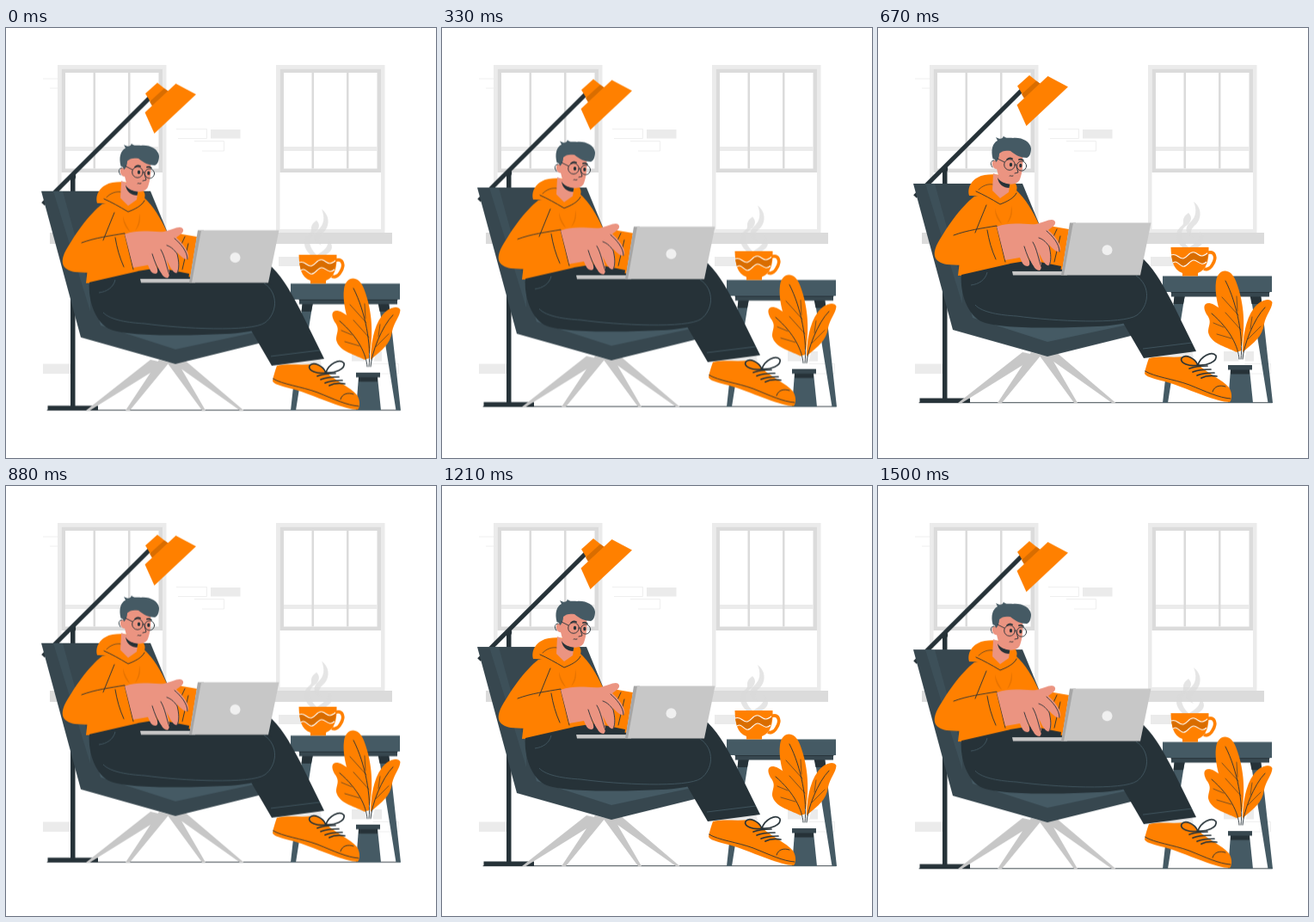
Recreate the animation shown at these times as an HTML page. Size 500x500 px, loop 1540 ms.

```html
<!DOCTYPE html>
<html lang="en">
<head>
<meta charset="utf-8">
<title>Working in an armchair</title>
<style>
html, body { margin: 0; width: 100%; height: 100%; overflow: hidden; background: #fff; }
svg { display: block; width: 100vw; height: 100vh; }
.orange { fill: #ff8000; }
.shade { fill: #d96d00; }
.ink { fill: #263238; }
.slate { fill: #455a64; }
.deep { fill: #37474f; }
.skin { fill: #eb9481; }
.pale { fill: #ebebeb; }
.mist { fill: #dbdbdb; }
.grey { fill: #c7c7c7; }
.white { fill: #fff; }
.line { fill: none; stroke: #263238; stroke-width: .9; stroke-linecap: round; stroke-linejoin: round; }
.thin { stroke-width: .6; }
.bold { stroke-width: 1.7; }
.seam { fill: none; stroke: #455a64; stroke-width: .9; }
.outline { fill: none; stroke: #ebebeb; stroke-width: .8; }
#scene { animation: float 1540ms linear infinite; }
@keyframes float {
  0%, 100% { transform: translateY(-.1px); }
  46% { transform: translateY(-9.6px); }
  95% { transform: translateY(.4px); }
}
</style>
</head>
<body>
<svg viewBox="0 0 500 500" xmlns="http://www.w3.org/2000/svg">
<defs>
  <g id="window">
    <path class="pale" d="M0 0H126.500V196H0Z"/>
    <path class="white" d="M4.500 4.500H122V191H4.500Z"/>
    <path class="mist" d="M4.500 4.500H122V125H4.500Z"/>
    <path class="white" d="M9 9H117.500V120.500H9Z"/>
    <path class="pale" d="M9 95H117.500V100H9Z"/>
    <path class="mist" d="M41.500 9h2.500V120.500h-2.500ZM82 9h2.500V120.500H82Z"/>
  </g>
</defs>

<g id="wall">
  <use href="#window" x="60" y="43"/>
  <use href="#window" x="314" y="43"/>
  <path class="mist" d="M51 238H191V251H51ZM309 238H449V251H309Z"/>
  <path class="pale" d="M43 390.500H75V402H43ZM317 266H349V277H317ZM402 376H437V387.500H402ZM238 118H272.500V128.500H238Z"/>
  <path class="outline" d="M198 117.500H233.500V128.500H200M219 131.500H253.500V143H228M422 390.500H456.500V402H428M43 59H61M51 70H61"/>
</g>

<g id="scene">
  <path class="line" d="M48 444.700H458"/>

  <g id="lamp">
    <path class="ink" d="M75 172H80.500V440H75ZM48.500 439.500H107V445H48.500Z"/>
    <circle class="ink" cx="77.700" cy="173" r="3.500"/>
    <path class="line" style="stroke-width:5.200;stroke-linecap:butt" d="M43 205 168 80.500"/>
    <path class="orange" d="M162 76.500 176 64 188.500 74 171 91Z"/>
    <path class="shade" d="M167 86 184 70.500 189 74 170 91Z"/>
    <path class="orange" d="M161.500 98.500 197.500 65 221 77.500 172.500 123Z"/>
  </g>

  <g id="chair">
    <path class="grey" d="M168 386 93 445H97.500L186 390ZM178 386 139 445H144L190 389ZM187 389 228 445H232L199 388ZM193 389 272 445H276.500L206 385Z"/>
    <path class="deep" d="M41 190H168L187 236 200 310 305 352 294 367 197 391 87 360Z"/>
    <path class="slate" d="M55 190H66L98 306V330Z" opacity=".5"/>
    <path class="slate" d="M96 296 110 346 197 374 300 352 200 300Z"/>
  </g>

  <g id="table">
    <path class="slate" d="M345 318H357L337 445H331ZM433 318H445L459 445H453.500Z"/>
    <path class="ink" d="M344.700 320H357L355 330H343.500ZM432.500 320H445L446.500 330H434.500Z"/>
    <path class="slate" d="M331 297.500H458V316H331Z"/>
    <path class="deep" d="M341 316H455V321.500H341Z"/>
    <path class="line" d="M341 316.500H455"/>
  </g>

  <g id="mug">
    <path class="mist" d="M367 211C378 219 376 233 368 239 363 244 363 248 367 253 357 249 356 241 363 235 370 229 371 220 367 211ZM361 224C367 230 363 236 357 240 350 246 353 256 361 264H354C345 256 345 246 352 240 359 236 350 232 361 224ZM374 246C381 252 381 259 372 264H362C370 259 376 254 374 246Z" opacity=".7"/>
    <path class="orange" d="M340.500 264H384.500C385 280 382 290 372 294V297.500H354V294C343 290 341 279 340.500 264Z"/>
    <path class="shade" d="M341 273C347 270 350 278 355 277S362 268 368 270 375 278 384 270L382 281C376 287 372 279 367 279S360 288 354 286 348 279 343 282Z"/>
    <path d="M341 273C347 270 350 278 355 277S362 268 368 270 375 278 384 270M343 282C348 279 349 284 354 286S362 279 367 279 376 287 382 281" fill="none" stroke="#fff" stroke-width="1.100"/>
    <path d="M383 270.500C392 268 394 276 389 284 386 290 381 290 379 289" fill="none" stroke="#ff8000" stroke-width="3.700"/>
  </g>

  <g id="plant">
    <path d="M421 402C421 390 418 380 413 371M423 402C422 390 424 369 421 350M425 402C425 390 429 376 433 368" fill="none" stroke="#fff" stroke-width="2.400"/>
    <path class="orange" d="M419 377C403 363 390 325 393 304 395 288 410 287 416 303 422 318 429 345 423 379Z"/>
    <path class="orange" d="M417 386C403 379 387 376 384 363 384 354 389 351 382 342 376 331 381 326 391 331 404 338 417 351 423 384Z"/>
    <path class="orange" d="M424 386C424 371 427 348 437 335 444 325 456 322 458.500 328 458 336 451 343 449 353 447 368 437 375 424 386Z"/>
    <path class="line" d="M420 394C419 380 410 360 388 341M422 394C425 370 418 330 404 303M424 394C425 378 437 347 450 334"/>
    <path class="line thin" d="M402 357 390 352M411 370 394 365M419 343 400 322M422 360 404 340M418 338 417 321M430 371 445 356M433 359 435 345"/>
    <path class="slate" d="M410 406H432L436 445H407Z"/>
    <path class="ink" d="M410 406H432V411.500H410Z"/>
    <path class="deep" d="M407 401H435V406.500H407Z"/>
  </g>

  <g id="shoe">
    <path class="pale" d="M316 384 364 380 367 392 318 397Z"/>
    <path class="orange" d="M315 393C329 390 342 393 357 391 362 389 367 394 372 400 383 411 401 418 408 427 412 433 412 441 409 444 394 444 364 430 340 422 324 417 313 416 310 411 311 404 313 399 315 393Z"/>
    <path class="line" d="M310.500 408C322 415 343 417 362 424 382 432 396 439 410 440M389 432C391 425 398 424 404 426"/>
    <path class="line bold" d="M362 405C370 402 376 402 383 402M366 409C373 406 380 406 387 406M371 413C378 410 384 410 391 410M376 416C382 413 388 413 394 414"/>
    <path class="line bold" d="M372 401C363 403 350 399 353 393 357 388 368 392 372 401 375 391 388 384 393 390 395 397 382 402 372 401"/>
  </g>

  <g id="body">
    <path class="ink" d="M285 278H309C324 293 333 311 342 328L370 385 309 393 284 350Z"/>
    <path class="seam" d="M308 382 365 375"/>
    <path class="orange" d="M160 197C172 208 180 222 187 237L222 243 214 292 93 297 97 262 112 205Z"/>
    <path class="ink" d="M97 296 154 283 216 290H300C317 302 318 330 302 345 289 357 252 356 214 357.500 173 358 139 357 122 351 104 344 95 316 97 296Z"/>
    <path class="seam" d="M300 297C318 309 315 333 301 343 285 354 205 350 161 344 143 343 121 340 113 331M108 308C117 307 125 302 127 293"/>
  </g>

  <g id="head">
    <path class="orange" d="M106 204C103 192 112 182 124 180 139 177 160 182 161.500 194 162 205 151 210 142 214 128 209 119 203 106 204Z"/>
    <path class="line thin" d="M117 197C122 192 128 190 134 191"/>
    <path class="skin" d="M134 178 154 186 152 200 142 207 133 198Z"/>
    <path class="ink" d="M139 183C142 188 148 190 153.500 190L152.500 195C146 195 140 191 139 183Z"/>
    <path class="skin" d="M136 151C146 146 161 149 168 158 169 166 168 177 165 185 162 192 152 192 145 188 140 184 139 176 138 173 132 173 131 162 136 163Z"/>
    <path class="slate" d="M133.500 161C131 151 133 143 139 140L137 136C142 139 145 138 146 134.500 148 138 152 136 157 137 167 136 177 141 178 149 178 155 176 159 173 160 166 160 160 157 154 152 148 151 144 152 141 155 141 160 139 164 137 165L136 162Z"/>
    <path class="line" d="M133 171C130 167 131 163 135 163M139 161 147 165M159 169C160 167 161 168 161.500 169M161 170 163 177 159 178M153 181C154 180 155 182 157 181"/>
    <path class="line bold" d="M150 162C152 160 154 160 156 161M164 162C166 161 168 162 169 163"/>
    <circle class="line" cx="153" cy="168" r="6.300"/>
    <circle class="line" cx="167" cy="169.500" r="5.600"/>
    <ellipse class="ink" cx="154.500" cy="168" rx="1.700" ry="2.300"/>
    <ellipse class="ink" cx="165.800" cy="169" rx="1.600" ry="2.300"/>
  </g>

  <g id="arms">
    <path class="line" d="M114 199C123 203 132 208 142 214 150 211 158 207 161 201"/>
    <path class="shade" d="M136 219C138 227 142 232 144 237 139 233 136 227 136 219ZM155 216C155 225 153 231 150 236 156 231 157 222 155 216Z" opacity=".6"/>
    <path class="orange" d="M112 205C97 216 78 243 68 262 63 274 66 281 80 284 99 286 128 284 148 281L138 239C131 240 122 242 113 246L126 213Z"/>
    <path class="line" d="M88 250C104 244 121 242 138 239L148 281M113 247 126 215M127 244C129 256 132 267 137 278M205 281 212 251M202 256 208 243"/>
    <path class="ink" d="M153 283 178 279 213 286 212 293H160Z"/>
    <path class="grey" d="M156 292H216V296.500H157Z"/>
    <path class="skin" d="M138 240C154 234 171 238 184 237 193 235 201 230 205 233 209 237 202 241 198 244 205 250 214 261 212 268 210 272 203 266 199 261 201 270 203 282 199 285 195 287 190 277 187 270 189 279 192 288 188 291 181 291 178 280 174 274 176 281 178 285 174 286 169 286 167 281 165 276L148 279Z"/>
    <path class="line" d="M187 253C193 255 196 259 199 263 201 271 202 280 199 285M180 258C185 266 187 280 190 287M170 263C173 272 176 281 181 287M196 245C203 251 211 260 211 269"/>
  </g>

  <g id="laptop">
    <path d="M223 235.500H230L220 296.500H213Z" fill="#a6a6a6"/>
    <path class="grey" d="M227 235.500H317.500L305 296.500H216Z"/>
    <circle cx="266.500" cy="267.300" r="6" fill="#f0f0f0"/>
  </g>
</g>
</svg>
</body>
</html>
```
